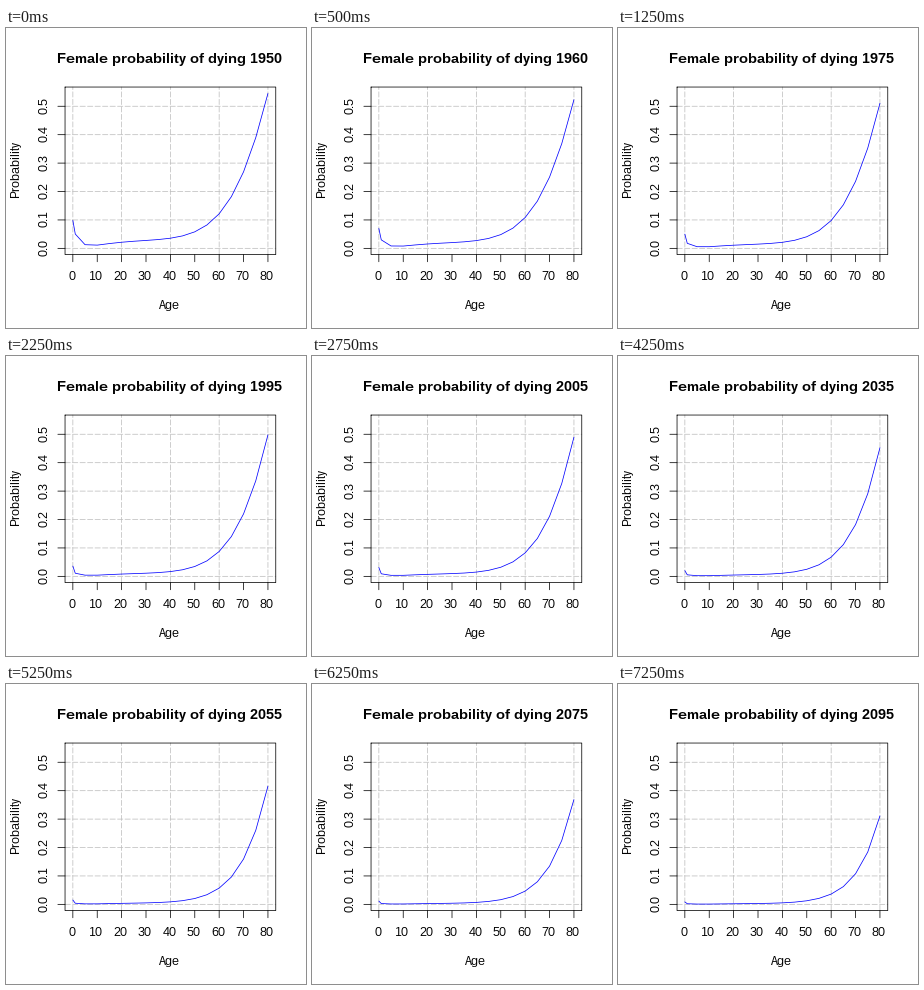
A matplotlib script for the animation above (7500 ms loop, 300 by 300 pixels).

```python
import numpy as np
import matplotlib.pyplot as plt
from matplotlib.animation import FuncAnimation

SIZE, DPI = 300, 100
PX = 72 / DPI  # one pixel in points
LINE = 0.75 * PX
FRAMES, INTERVAL = 30, 250

LEFT, RIGHT, TOP, BOTTOM = 59.04, 269.76, 59.04, 226.56
X0, X_STEP = 66.84, 195.1 / 80
Y0, Y_STEP = 220.36, 284.2

AGES = np.array([0, 1, *range(5, 81, 5)])


def dying(age, t):
    """Probability of dying at an age, t years after the start."""
    early = np.exp(-t / 10)
    level = np.exp(-0.0142 * t) + 0.45 * early

    # Infant deaths fade quickly with age
    infant = 0.060 * level * np.exp(-age * (1.9 - 1.1 * np.exp(-t / 40)))

    # Adult background risk rises from age 10 to a plateau
    adult = 0.0195 * level * (0.4 + 0.6 * np.tanh(np.maximum(age - 10, 0) / 15))

    # Old-age risk falls off with the years left until 80
    peak = 0.511 - 0.2 * (t / 145) ** 2.3 + 0.034 * early
    slope = 0.067 + 2e-4 * t + 4e-7 * t ** 2
    bend = 0.00202 - 0.0163 * slope
    left = 80 - age
    old = np.exp(-slope * left - bend * left ** 2)

    return infant + adult * (1 - old) + peak * old


def to_x(age):
    return X0 + age * X_STEP


def to_y(prob):
    return Y0 - prob * Y_STEP


plt.rcParams.update({
    "font.family": "Liberation Sans",
    "text.hinting": "default",
    "text.hinting_factor": 1,
    "toolbar": "None",
})
fig = plt.figure(figsize=(SIZE / DPI, SIZE / DPI), dpi=DPI, facecolor="white")
ax = fig.add_axes([0, 0, 1, 1])
ax.set(xlim=(0, SIZE), ylim=(SIZE, 0))
ax.axis("off")


def rule(xs, ys, color="black", **style):
    return ax.plot(xs, ys, color=color, lw=LINE, snap=False,
                   solid_capstyle="round", solid_joinstyle="round", **style)[0]


def label(x, y, text, size=12, upright=False, **style):
    # Centring ignores side bearings, so pull the text back one pixel
    dx, dy = (0, -1) if upright else (-1, 0)
    return ax.text(x + dx, y + dy, text, fontsize=size * PX, ha="center",
                   va="baseline", rotation=90 if upright else 0,
                   rotation_mode="anchor", **style)


GRID = dict(color="#bebebe", dashes=(7, 3), dash_capstyle="round", zorder=1)
for age in range(0, 81, 20):
    rule([to_x(age)] * 2, [BOTTOM, TOP], **GRID)
for tenth in range(6):
    rule([LEFT, RIGHT], [to_y(tenth / 10)] * 2, **GRID)

rule([LEFT, RIGHT, RIGHT, LEFT, LEFT], [TOP, TOP, BOTTOM, BOTTOM, TOP])
for age in range(0, 81, 10):
    rule([to_x(age)] * 2, [BOTTOM, BOTTOM + 7.2])
    label(to_x(age), 252.48, str(age))
for tenth in range(6):
    y = to_y(tenth / 10)
    rule([LEFT, LEFT - 7.2], [y, y])
    label(41.76, y, f"{tenth / 10:.1f}", upright=True)

MID_X, MID_Y = (LEFT + RIGHT) / 2, (TOP + BOTTOM) / 2
label(MID_X, 281.28, "Age")
label(12.96, MID_Y, "Probability", upright=True)
title = label(MID_X, 34.7, "", size=14.4, weight="bold")
curve = rule([], [], color="blue", zorder=3)


def draw(frame):
    t = 5 * frame
    title.set_text(f"Female probability of dying {1950 + t}")
    curve.set_data(to_x(AGES), to_y(dying(AGES, t)))
    return title, curve


anim = FuncAnimation(fig, draw, frames=FRAMES, interval=INTERVAL, repeat=True,
                     repeat_delay=0, blit=False)
plt.show()
```
